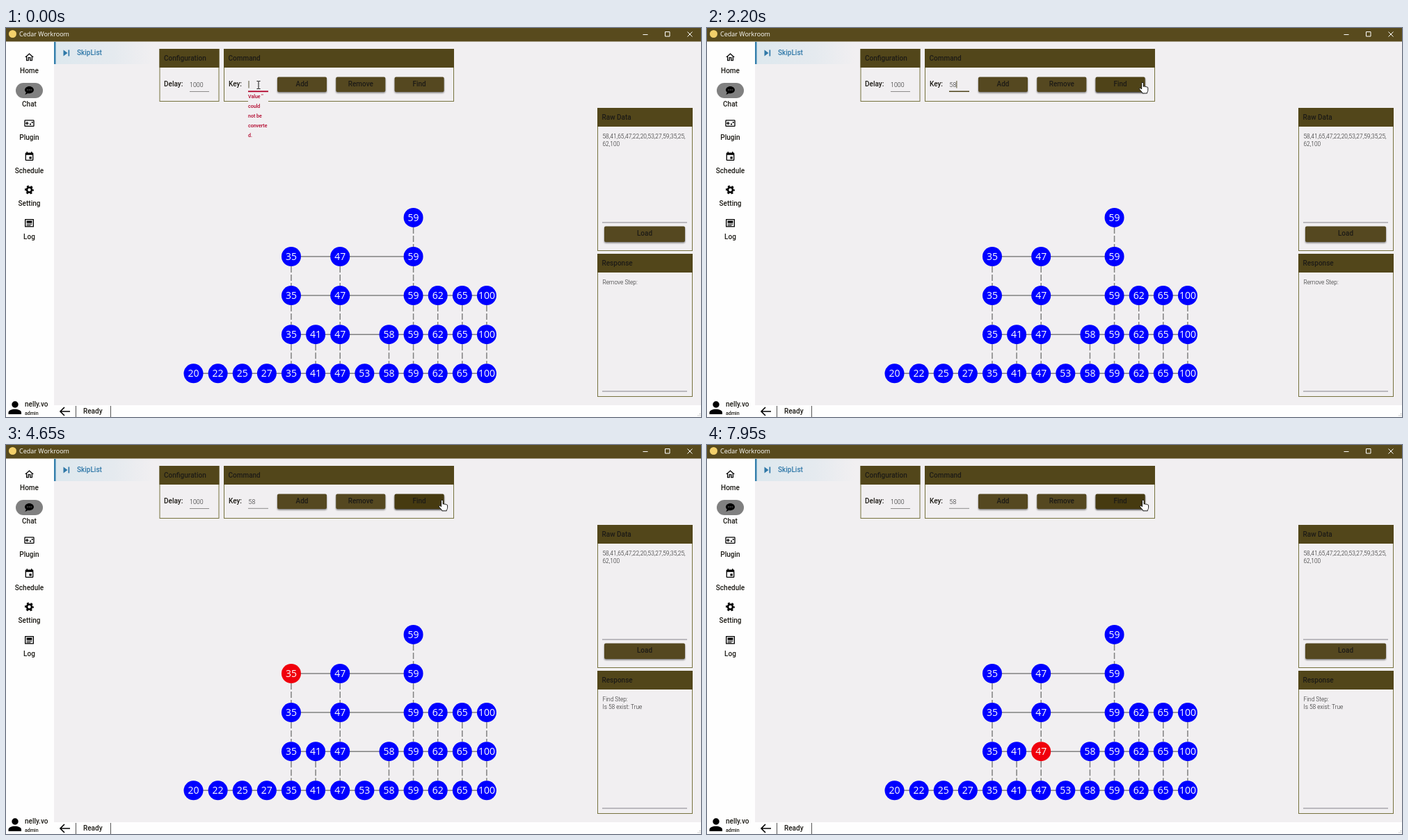
Recreate the animation shown at these times as an HTML page. Size 999 px wide and 560 px high, loop 8000 ms.

```html
<!DOCTYPE html>
<html lang="en">
<head>
<meta charset="utf-8">
<title>Skip list search</title>
<style>
html, body { margin: 0; width: 100%; height: 100%; overflow: hidden; background: #f1eff1; }
svg { display: block; width: 100%; height: 100%; }
text { font-family: Roboto, sans-serif; font-size: 10px; font-weight: 500; fill: #1d1b16; white-space: pre; }
.mid { text-anchor: middle; }
.light { font-size: 8.33px; font-weight: 300; fill: #222; }
.input { font-size: 8.8px; }
.error { font-size: 7px; fill: #b00028; }
.node { font: 14px "Open Sans", "Noto Sans", sans-serif; fill: #fff; }
.title { font: 9px "Open Sans", "Noto Sans", sans-serif; fill: #fff; }
.blue { fill: #2f78a8; }
</style>
</head>
<body>
<svg id="stage" viewBox="0 0 999 560"></svg>
<script>
const stage = document.getElementById('stage');
const LOOP = 8000, FIRST_KEY = 800, SECOND_KEY = 1060, MOVE_START = 1650, MOVE_END = 2150;
const CLICK = 3450, STEP = 1000;
const OLIVE = '#52461a', BUTTON = '#554820', HOVER = '#4f4318', FOCUS = '#463a10', PAGE = '#f1eff1';

function add(tag, attrs = {}, parent = stage, content = '') {
  const el = document.createElementNS('http://www.w3.org/2000/svg', tag);
  for (const name in attrs) el.setAttribute(name, attrs[name]);
  el.textContent = content;
  parent.append(el);
  return el;
}
const rect = (x, y, width, height, fill, more) => add('rect', { x, y, width, height, fill, ...more });
const text = (x, y, content, cls = '', parent) => add('text', { x, y, class: cls }, parent, content);
const line = (x1, y1, x2, y2, stroke, width = 1, more) =>
  add('line', { x1, y1, x2, y2, stroke, 'stroke-width': width, ...more });
const path = (d, more, parent) => add('path', { d, ...more }, parent);
const stroked = (stroke, width) => ({ fill: 'none', stroke, 'stroke-width': width });
const show = (el, visible) => el.setAttribute('visibility', visible ? 'visible' : 'hidden');

// Window frame
const defs = add('defs');
const fade = add('linearGradient', { id: 'fade' }, defs);
add('stop', { offset: 0, 'stop-color': '#dde8ee' }, fade);
add('stop', { offset: 0.6, 'stop-color': '#e5eaef' }, fade);
add('stop', { offset: 1, 'stop-color': PAGE }, fade);
const blur = add('filter', { id: 'blur', x: '-20%', y: '-50%', width: '140%', height: '200%' }, defs);
add('feGaussianBlur', { stdDeviation: 1.3 }, blur);

rect(0, 0, 999, 560, PAGE);
rect(0, 19, 69, 541, '#fefefe');
rect(69, 543, 930, 17, '#fefefe');
rect(0, 0, 999, 19.5, '#584a1d');
add('circle', { cx: 9.5, cy: 8.5, r: 5.5, fill: '#f3d06b' });
text(19, 12, 'Cedar Workroom', 'title');
path('M915.5 9.5h7M947.5 5.5h6.5v6.5h-6.5zM979.5 5.5l7 7m0-7l-7 7', stroked('#fff', 1));

// Sidebar
const icons = {
  Home: 'M12 5.7l5 4.5V18h-2v-6H9v6H7v-7.8zM12 3L2 12h3v8h6v-6h2v6h6v-8h3z',
  Chat: 'M12 3c5.5 0 10 3.6 10 8s-4.5 8-10 8c-1.2 0-2.4-.2-3.5-.5C5.5 21 2 21 2 21c2.3-2.3 2.7-3.9 2.8-4.5C3 15 2 13 2 11c0-4.400 4.500-8 10-8m5 9v-2h-2v2zm-4 0v-2h-2v2zm-4 0v-2H7v2z',
  Plugin: 'M21 4H3a2 2 0 0 0-2 2v11a2 2 0 0 0 2 2h18a2 2 0 0 0 2-2V6a2 2 0 0 0-2-2m0 13H3V6h18zM6 15h2v-2.500h2.500v-2H8V8H6v2.500H3.500v2H6zM13 12h3v3h-3zM17 8h3v3h-3z',
  Schedule: 'M19 19H5V8h14zM16 1v2H8V1H6v2H5a2 2 0 0 0-2 2v14a2 2 0 0 0 2 2h14a2 2 0 0 0 2-2V5a2 2 0 0 0-2-2h-1V1zm1 11h-5v5h5z',
  Setting: '',
  Log: 'M3 3h18a1 1 0 0 1 1 1v16a1 1 0 0 1-1 1H3a1 1 0 0 1-1-1V4a1 1 0 0 1 1-1m1 2v14h16V5zM6 7h12v5H6zM6 13.500h12v1.500H6zM6 16.500h9v1.500H6z'
};
Object.entries(icons).forEach(([label, d], i) => {
  const y = 42 + i * 47.75;
  if (label === 'Chat') rect(14, 79, 39, 22, '#808080', { rx: 11 });
  const icon = add('g', { transform: `translate(33.5 ${y}) scale(.65) translate(-12 -12)` });
  if (d) path(d, { 'fill-rule': 'evenodd' }, icon);
  else {
    add('circle', { cx: 12, cy: 12, r: 5.4, ...stroked('#000', 4) }, icon);
    const tooth = 8.5 * Math.PI / 6;
    add('circle', { cx: 12, cy: 12, r: 8.5, ...stroked('#000', 3),
      'stroke-dasharray': tooth, 'stroke-dashoffset': tooth / 2 }, icon);
  }
  text(33.5, y + 23.3, label, 'mid');
});
add('circle', { cx: 13, cy: 542, r: 4.7 });
path('M3.500 556v-2.500c0-6.500 18.500-6.500 18.500 0v2.500z');
text(27, 545, 'nelly.vo');
text(27, 557, 'admin').style.fontSize = '7px';

// Tab and status bar
rect(69, 20, 144, 32, 'url(#fade)');
rect(69, 20, 2.5, 32, '#3580ad');
path('M82.500 31.500v9l6-4.500zM89.500 31.500h1.700v9h-1.700z', { class: 'blue' });
text(102, 39, 'SkipList', 'blue');
path('M92 552H78m6-6l-6 6 6 6', stroked('#000', 1.6));
line(100.5, 544, 100.5, 560, '#555');
line(150.5, 544, 150.5, 560, '#555');
text(111, 555, 'Ready');
path('M997 555h1v1h-1zM994.500 557.500h1v1h-1zM997 557.500h1v1h-1z', { fill: '#999' });

// Panels
function panel(x, y, width, height, title) {
  rect(x + .5, y + .5, width - 1, height - 1, 'none', { stroke: '#77733f' });
  rect(x, y, width, 27, OLIVE);
  text(x + 6.5, y + 16.5, title);
}
function button(x, y, width, height, label) {
  const shadow = rect(x, y + 1.5, width, height, '#000', { rx: 2, opacity: .5, filter: 'url(#blur)' });
  const face = rect(x, y, width, height, BUTTON, { rx: 2 });
  text(x + width / 2, y + height / 2 + 2.3, label, 'mid');
  return { x, width, shadow, face };
}
panel(220.5, 30, 86, 76, 'Configuration');
panel(313, 30, 331, 76, 'Command');
panel(850, 115, 137, 206, 'Raw Data');
panel(850, 325, 137, 206, 'Response');
text(227, 83.5, 'Delay:');
text(264, 84.5, '1000', 'light input');
line(264, 91.5, 292, 91.5, '#8d8b8a');
text(320, 83.5, 'Key:');
const buttons = ['Add', 'Remove', 'Find'].map((label, i) => button(390 + i * 84.3, 70.5, 71, 21.5, label));
button(860, 285.5, 116, 22.5, 'Load');
text(857.5, 159, '58,41,65,47,22,20,53,27,59,35,25,', 'light');
text(857.5, 170, '62,100', 'light');
line(857, 280, 979, 280, '#85838a');
line(857, 523, 979, 523, '#85838a');
const response = text(857.5, 369, '', 'light');
const verdict = text(857.5, 380, 'Is 58 exist: True', 'light');

// Key field
const keyText = text(348.5, 84.5, '', 'light input');
const keyLine = line(348, 91.3, 377, 91.3, '#000');
const caret = line(0, 76, 0, 86.5, '#55502f');
const error = add('g');
add('rect', { x: 348, y: 93, width: 29, height: 67, fill: PAGE }, error);
["Value ''", 'could', 'not be', 'converte', 'd.'].forEach((part, i) =>
  text(348, 100.5 + i * 14, part, 'error', error));

// Skip list
const heights = { 20: 1, 22: 1, 25: 1, 27: 1, 35: 4, 41: 2, 47: 4, 53: 1, 58: 2, 59: 5, 62: 3, 65: 3, 100: 3 };
const keys = Object.keys(heights);
const nodeX = i => 269.5 + i * 35.12, nodeY = level => 497.3 - level * 56.1;
for (let level = 0; level < 5; level++) {
  const row = keys.map((_, i) => i).filter(i => heights[keys[i]] > level);
  row.forEach((i, n) => {
    const x = nodeX(i), y = nodeY(level);
    if (n) line(nodeX(row[n - 1]), y, x, y, '#808080', 1.5);
    if (level) line(x, y + 14, x, y + 42, '#808080', 1.5, { 'stroke-dasharray': '9 3' });
  });
}
const nodes = {};
keys.forEach((key, i) => {
  for (let level = 0; level < heights[key]; level++) {
    nodes[key + '@' + level] = add('circle', { cx: nodeX(i), cy: nodeY(level), r: 14, fill: '#00f' });
    text(nodeX(i), nodeY(level) + 5, key, 'node mid');
  }
});
const route = ['35@3', '47@3', '47@2', '47@1'];

// Pointers, each drawn around its hot spot
const pointers = {
  beam: path('M-2.500 -5.500h2l.5 .5 .5-.5h2M0 -5v10M-2.500 5.500h2l.5-.5 .5 .5h2', stroked('#111', 1)),
  arrow: path('M0 0v13l3-3 2 4.500 2-1-2-4.300h4z', { fill: '#fff', stroke: '#000', 'stroke-width': .8 }),
  hand: path('M-1.300 1c0-1.500 2.600-1.500 2.600 0v5c.5-1 2.300-.8 2.400.3.500-.8 2.200-.5 2.300.5.600-.6 1.800-.2 1.800.8v3.400c0 2-1.300 2.500-1.300 4.500H0c0-2-4.500-5-4.500-6.500 0-1.400 1.700-1.400 3.200.5z',
    { fill: '#fff', stroke: '#000', 'stroke-width': .9 })
};

function draw(t) {
  const invalid = t < FIRST_KEY, focused = t < CLICK;
  const typed = invalid ? '' : t < SECOND_KEY ? '5' : '58';
  keyText.textContent = typed;
  show(error, invalid);
  keyLine.setAttribute('stroke', invalid ? '#b00028' : focused ? '#4a4015' : '#8d8b8a');
  keyLine.setAttribute('stroke-width', invalid ? 1.8 : focused ? 1.5 : 1);
  const caretX = 349 + typed.length * 4.95;
  caret.setAttribute('x1', caretX);
  caret.setAttribute('x2', caretX);
  const lastKey = invalid ? 0 : t < SECOND_KEY ? FIRST_KEY : SECOND_KEY;
  show(caret, focused && (t - lastKey) % 1060 < 530);

  const p = Math.min(1, Math.max(0, (t - MOVE_START) / (MOVE_END - MOVE_START)));
  const eased = p * p * (3 - 2 * p), nudge = t > 2800 ? .8 : 0;
  const x = 363 + 263 * eased + nudge, y = 82 - 3.5 * eased + nudge;
  const hovered = buttons.find(b => x >= b.x && x <= b.x + b.width);
  const kind = hovered ? 'hand' : x < 377 ? 'beam' : 'arrow';
  for (const name in pointers) {
    show(pointers[name], name === kind && (t < FIRST_KEY || t >= MOVE_START));
    pointers[name].setAttribute('transform', `translate(${x} ${y})`);
  }
  const press = Math.min(1, Math.max(0, (t - CLICK) / 300));
  buttons.forEach((b, i) => {
    const over = b === hovered;
    b.face.setAttribute('fill', i === 2 && press === 1 ? FOCUS : over ? HOVER : BUTTON);
    b.shadow.setAttribute('opacity', over ? .8 : .5);
  });

  response.textContent = focused ? 'Remove Step:' : 'Find Step:';
  show(verdict, !focused);
  const step = Math.floor((t - CLICK) / STEP) - 1;
  route.forEach((id, i) => nodes[id].setAttribute('fill', i === step ? '#f0000c' : '#00f'));
}

function tick() {
  draw(performance.now() % LOOP);
  requestAnimationFrame(tick);
}
tick();
</script>
</body>
</html>
```
